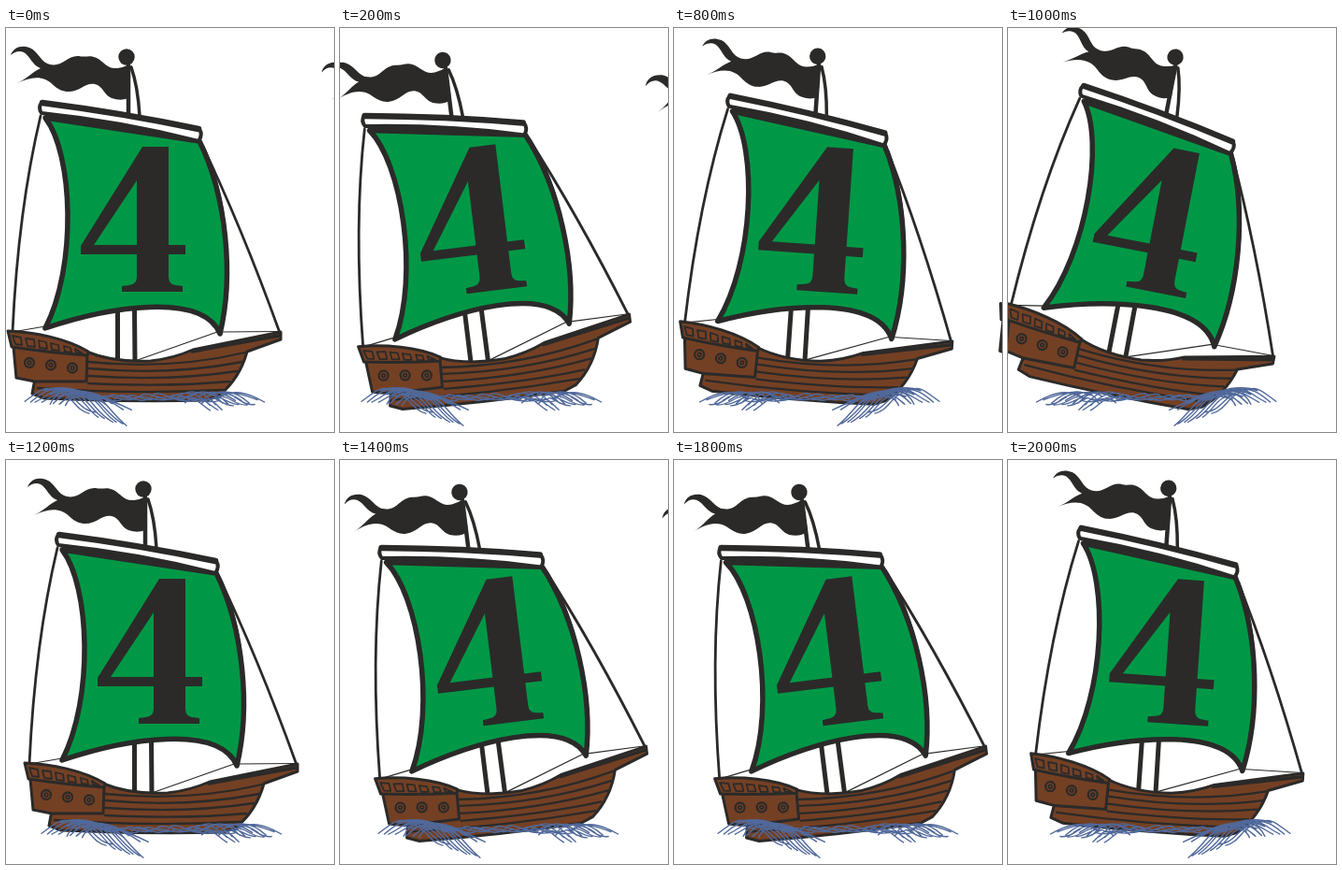
These frames come from a looping animation (351x432 px, 2.2 s). An HTML page:

```html
<!DOCTYPE html>
<html lang="en">
<head>
<meta charset="utf-8">
<title>Sailing ship</title>
<style>
  html, body { margin: 0; width: 100%; height: 100%; overflow: hidden; background: #fff; }
  svg { display: block; width: 351px; height: 432px; }
  .line { fill: none; stroke: #2b2a29; stroke-linecap: round; stroke-linejoin: round; }
  .ink { fill: #2b2a29; }
  .wood { fill: #744024; stroke: #2b2a29; stroke-width: 3; stroke-linejoin: round; }
</style>
</head>
<body>
<svg viewBox="0 0 351 432" role="img" aria-label="Ship with the number 4 on its sail">
  <defs>
    <g id="ship">
      <!-- flag and masthead -->
      <path class="ink" d="M5 29C8 21 16 18 25 21C35 25 37 37 47 39C61 42 65 29 78 30C86 32 89 28 97 32C106 37 108 44 119 43Q126 42 132 39L133 74Q124 79 113 75C105 72 104 62 95 60C85 58 79 68 67 68C54 68 50 58 42 55C33 51 22 54 12 59C23 54 28 47 37 43C28 40 26 30 19 26Q12 23 5 29Z"/>
      <circle class="ink" cx="129" cy="31" r="8.7"/>
      <path class="line" stroke-width="4.5" d="M131 40V92"/>
      <path class="line" stroke-width="3.5" d="M134 42Q141 62 143 94"/>
      <!-- lower mast and rigging -->
      <path class="line" stroke-width="5" d="M119.500 302V354M137.500 300L138 357"/>
      <path class="line" stroke-width="2.800" d="M37 94Q13 195 7 325M208 121Q252 212 293 326"/>
      <path class="line" stroke-width="1.200" d="M7 325L42 319M229 325L293 324.500M138 356L229 324"/>
      <!-- sail -->
      <path class="line" style="fill:#009846" stroke-width="5.500" d="M42 96C72 135 76 255 42 321C110 298 210 282 229 327C244 265 236 180 207 121Z"/>
      <path class="ink" d="M42 92Q125 101 207 121L42 98Z"/>
      <path class="line" stroke-width="2.500" d="M211 126C238 185 243 265 230 323"/>
      <path class="ink" fill-rule="evenodd" d="M146 127H174V232H192V242H174V266Q174 274 181 275L189 276V282H124V276L132 275Q140 274 140 266V242H80V233ZM140 163L94 232H140Z"/>
      <!-- yard -->
      <path class="line" style="fill:#fff" stroke-width="4" d="M38 80Q125 90 207 108Q211 114 206 121Q125 100 38 91Q34 85 38 80Z"/>
      <path class="line" stroke-width="6.500" d="M39 80Q125 91 206 108"/>
      <!-- hull -->
      <path class="wood" d="M31 375L28 391L41 396Q130 400 215 398L228 393Q250 375 258 346L294 333V325L200 344Q180 353 155 356Q115 358 86 346Z"/>
      <path class="wood" d="M8 341L11 374L31 378H86L87 347Z"/>
      <path class="wood" d="M2 324C30 325 65 332 88 346L87 350Q45 347 6 341Z"/>
      <path class="line" stroke-width="1.800" d="M7 329L10 338L17 339L16 331ZM21 332L23 340L31 341L30 333ZM35 334L36 342L44 343L43 336ZM48 337L49 344L57 345L56 339ZM62 340L63 346L70 347L69 342ZM74 343L75 347L82 348Z"/>
      <path class="line" stroke-width="2.300" d="M88 357Q175 366 256 347M88 364Q175 372 253 357M88 372Q175 378 247 367M88 380Q175 384 239 378M34 385Q130 392 232 387"/>
      <path class="line" stroke-width="3.500" d="M199 346L292 329"/>
      <g id="ports"></g>
    </g>
    <g id="water" fill="none" stroke="#50689a" stroke-width="1.400" stroke-linecap="round"></g>
  </defs>
  <g id="scene"></g>
</svg>
<script>
  const STEP_MS = 200, STEPS = 11, DRIFT = 3, STAGE_WIDTH = 351;
  const PIVOT = [146, 213];
  const TILT = [0, -7, -12, -7, 4, 11];
  const get = id => document.getElementById(id);

  get('ports').innerHTML = [[25, 358], [48, 360.5], [71, 363.5]].map(([x, y]) =>
    `<circle class="line" cx="${x}" cy="${y}" r="5" stroke-width="2.300"/>` +
    `<circle class="line" cx="${x}" cy="${y}" r="1.800" stroke-width="1.800"/>`).join('');

  let seed = 7;
  const jitter = size => {
    seed = (seed * 16807) % 2147483647;
    return (seed / 2147483647 - 0.5) * size;
  };
  const curves = (count, shape) => Array.from({ length: count }, (_, i) => {
    const points = shape(i).map(v => (v + jitter(5)).toFixed(1));
    return `M${points[0]} ${points[1]}C${points.slice(2).join(' ')}`;
  }).join('');

  const spray = [
    // wisps behind the stern
    curves(8, i => [56 + 5 * i, 386 + i, 42 + 5 * i, 382 + i, 32 + 5 * i, 390 + i, 21 + 6 * i, 398 + i]),
    // crest below the stern
    curves(8, i => [38 + 4 * i, 388 + i, 55 + 5 * i, 380 + i, 74 + 5 * i, 386 + i, 92 + 6 * i, 397 + 1.5 * i]),
    // splash falling away from the crest
    curves(8, i => [56 + 5 * i, 391 + i / 2, 72 + 4 * i, 390, 76 + 5 * i, 408 + i, 88 + 6 * i, 411 + 2 * i]),
    // ripples along the keel
    curves(11, i => [86 + 10 * i, 395, 96 + 10 * i, 386, 110 + 10 * i, 404, 126 + 10 * i, 396]),
    // bow wave
    curves(9, i => [176 + 7 * i, 398 - i / 2, 188 + 7 * i, 386, 202 + 7 * i, 386 + i / 2, 216 + 7.5 * i, 402 - i / 3]),
    curves(7, i => [190 + 9 * i, 402 - i, 200 + 8 * i, 393, 205 + 8 * i, 402, 217 + 8 * i, 408 - i])
  ];
  get('water').innerHTML = `<path d="${spray.join('')}"/>`;

  function drawShip(step, offset) {
    const pose = step % TILT.length;
    const mirror = TILT[pose] > 0 ? `translate(${2 * PIVOT[0]} 0) scale(-1 1)` : '';
    return `<g transform="translate(${offset + DRIFT * step} 0)">` +
      `<use href="#ship" transform="rotate(${TILT[pose]} ${PIVOT})"/>` +
      `<use href="#water" transform="${mirror}"/></g>`;
  }

  // The following pose wraps around and peeks in at the right edge.
  const scenes = Array.from({ length: STEPS }, (_, step) =>
    drawShip(step, 0) + drawShip((step + 1) % STEPS, STAGE_WIDTH));

  const start = performance.now();
  let shown = -1;
  function tick() {
    const step = Math.floor((performance.now() - start) / STEP_MS) % STEPS;
    if (step !== shown) get('scene').innerHTML = scenes[shown = step];
    requestAnimationFrame(tick);
  }
  tick();
</script>
</body>
</html>
```
